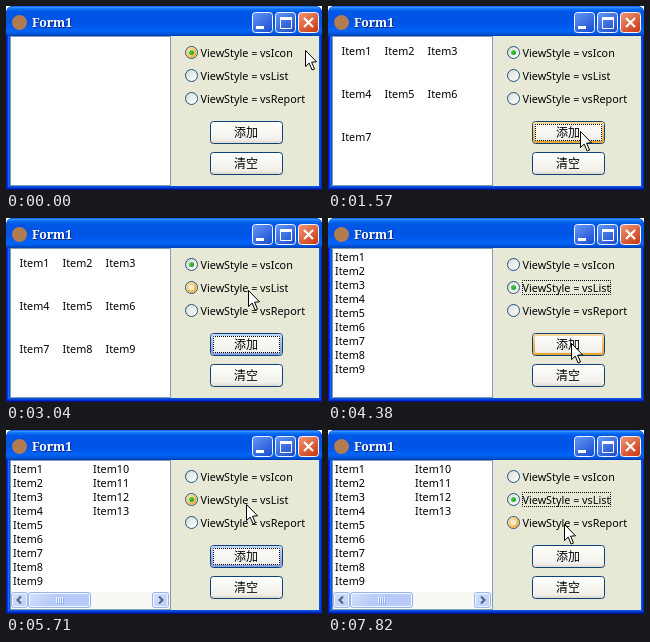
Animation, 316 px wide and 184 px high, one loop 8000 ms. Source, as an HTML page with a canvas:

```html
<!DOCTYPE html>
<html lang="zh">
<head>
<meta charset="utf-8">
<title>Form1</title>
<style>
html, body { margin: 0; width: 100%; height: 100%; overflow: hidden; background: #fff; }
canvas { display: block; }
</style>
</head>
<body>
<canvas id="stage" width="316" height="184"></canvas>
<script>
const c = document.getElementById('stage').getContext('2d');
const LOOP = 8000;
const UI = '10.8px "Noto Sans", "Open Sans", sans-serif';
const CJK = '12px "Noto Sans CJK SC", "Noto Sans CJK", sans-serif';
const TITLE = 'bold 12.3px "Noto Serif", "Liberation Serif", serif';
const FACE = '#e8e8d7';

// Cursor travel: start, end, steps, target x, target y
const START = [299, 44];
const MOVES = [
  [60, 420, 7, 252, 125],
  [2680, 3040, 7, 242, 72],
  [4020, 4380, 7, 243, 125],
  [5530, 5710, 4, 240, 74],
  [5770, 5770, 1, 239, 47],
  [6620, 6930, 6, 238, 69],
  [7580, 7820, 5, 236, 94]
];
const ADDED = [680, 810, 1010, 1130, 1260, 1380, 1570, 1760, 1950, 4570, 4760, 4950, 5070];
const PRESS = 60;
const CHECKED = [[0, 0], [3360, 1], [6030, 0], [7180, 1]];
const FOCUS = [[0, ''], [620, 'add'], [3300, 1], [4510, 'add'], [5970, 0], [7120, 1]];
const RADIOS = [['vsIcon', 46.5, 288], ['vsList', 69.5, 283], ['vsReport', 92.5, 300]];

const at = (steps, t) => steps.filter(s => s[0] <= t).pop()[1];

function cursorAt(t) {
  let [x, y] = START;
  for (const [a, b, n, tx, ty] of MOVES) {
    if (t < a) break;
    const k = t >= b ? n : Math.floor((t - a) / (b - a) * (n - 1) + 1e-6) + 1;
    const u = k / n, e = u * u * (3 - 2 * u);
    x += Math.round((tx - x) * e);
    y += Math.round((ty - y) * e);
  }
  return [x, y];
}

function rect(x, y, w, h, fill) {
  c.fillStyle = fill;
  c.fillRect(x, y, w, h);
}

function grad(x0, y0, x1, y1, ...stops) {
  const g = c.createLinearGradient(x0, y0, x1, y1);
  stops.forEach((s, i) => Array.isArray(s)
    ? g.addColorStop(s[0], s[1])
    : g.addColorStop(i / (stops.length - 1), s));
  return g;
}

function box(x, y, w, h, r, fill, line) {
  c.beginPath();
  c.roundRect(x + .5, y + .5, w - 1, h - 1, r);
  if (fill) { c.fillStyle = fill; c.fill(); }
  if (line) { c.strokeStyle = line; c.lineWidth = 1; c.stroke(); }
}

function disc(x, y, r, fill, line, width = 1) {
  c.beginPath();
  c.arc(x, y, r, 0, 7);
  if (fill) { c.fillStyle = fill; c.fill(); }
  if (line) { c.strokeStyle = line; c.lineWidth = width; c.stroke(); }
}

function lines(color, width, ...pts) {
  c.beginPath();
  pts.forEach(([x, y], i) => i ? c.lineTo(x, y) : c.moveTo(x, y));
  c.strokeStyle = color;
  c.lineWidth = width;
  c.stroke();
}

function text(s, x, y, font = UI, color = '#000', align = 'left') {
  c.font = font;
  c.fillStyle = color;
  c.textAlign = align;
  c.fillText(s, x, y);
}

// Alternate whole pixels; the offset keeps the dashes on the pixel grid
function dotted(x, y, w, h) {
  c.setLineDash([1, 1]);
  c.lineDashOffset = .5;
  box(x, y, w, h, 0, null, '#000');
  c.setLineDash([]);
}

function caption(x, top, bottom, edge) {
  box(x, 6, 21, 21, 3, grad(x, 6, x + 16, 27, top, bottom), edge);
}

function frame() {
  rect(0, 0, 316, 184, '#fff');
  c.save();
  c.beginPath();
  c.roundRect(0, 0, 316, 184, [7, 7, 0, 0]);
  c.clip();
  ['#0019cf', '#0831d9', '#166aee', '#0855dd'].forEach((s, i) => rect(i, 0, 316 - i, 184, s));
  ['#0855dd', '#0441d8', '#0029c2'].forEach((s, i) => rect(313 + i, 0, 1, 184, s));
  ['#0855dd', '#0441d8', '#0029c2', '#00138c'].forEach((s, i) => rect(3 - i, 180 + i, 310 + 2 * i, 1, s));
  rect(0, 0, 316, 30, grad(0, 0, 0, 30, [0, '#0058ee'], [.05, '#3590fc'], [.1, '#0a6ff6'],
    [.2, '#0057e5'], [.5, '#0054e4'], [.66, '#0058ee'], [.8, '#0263f6'], [.88, '#005eea'],
    [.94, '#0050d4'], [1, '#003cae']));
  c.restore();

  disc(13.5, 16.5, 7.5, '#b07c50');
  text('Form1', 27, 22, TITLE, '#0a2a86');
  text('Form1', 26, 21, TITLE, '#fff');

  caption(246, '#6a9bf8', '#1c4fd2', '#f4f7ff');
  caption(269, '#6a9bf8', '#1c4fd2', '#f4f7ff');
  caption(292, '#f09a7c', '#cc3c14', '#f8f4f4');
  rect(250, 20, 8, 3, '#fff');
  box(274, 11, 12, 12, 0, null, '#fff');
  rect(274, 11, 12, 3, '#fff');
  lines('#fff', 2.2, [298, 12], [307, 21]);
  lines('#fff', 2.2, [307, 12], [298, 21]);
  rect(4, 30, 309, 150, FACE);
  rect(4, 30, 161, 150, '#7f9db9');
  rect(5, 31, 159, 148, '#fff');
}

function radio(i, y, right, on, hot, down, focus) {
  const x = 185.5;
  disc(x, y, 6, down ? grad(x - 5, y - 5, x + 5, y + 5, '#a6acac', '#e0e1dc')
    : grad(x - 5, y - 5, x + 5, y + 5, '#dcdcd6', '#fff'), '#1d5281');
  if (hot && !down) disc(x, y, 4.2, '#f2ead2', grad(x - 4, y - 4, x + 4, y + 4, '#fddc94', '#f0a828'), 2.4);
  if (on) disc(x, y, 2.5, grad(x - 2, y - 2, x + 2, y + 2, '#55d551', '#159a16'));
  text('ViewStyle = ' + RADIOS[i][0], 194.5, y + 4.5);
  if (focus) dotted(194, y - 7.5, right - 194, 15);
}

function button(label, y, hot, down, focus) {
  const x = 204, w = 73, h = 23;
  box(x, y, w, h, 3, down ? grad(0, y, 0, y + h, '#d8d7cd', '#e6e5df')
    : grad(0, y, 0, y + h, [0, '#fff'], [.8, '#f1f0ea'], [1, '#d8d2c6']), '#0c4276');
  const glow = hot ? ['#fddc9c', '#e8a028'] : focus ? ['#c4dcfc', '#7c98e4'] : null;
  if (glow && !down) {
    c.beginPath();
    c.roundRect(x + 2, y + 2, w - 4, h - 4, 2);
    c.strokeStyle = grad(0, y, 0, y + h, ...glow);
    c.lineWidth = 2;
    c.stroke();
  }
  if (focus) dotted(x + 3, y + 3, w - 6, h - 6);
  const d = down ? 1 : 0;
  text(label, x + 36 + d, y + 16 + d, CJK, '#000', 'center');
}

function scrollBox(x, y, w, h) {
  box(x, y, w, h, 2, grad(x, y, x + Math.min(w, 17), y + Math.min(h, 17), '#d6e3fe', '#b7cbf8'), '#9cb4ec');
  box(x + 1, y + 1, w - 2, h - 2, 1, null, '#f0f5ff');
}

function arrow(x, y, angle) {
  c.save();
  c.translate(x, y);
  c.rotate(angle);
  lines('#4d6185', 2, [-3.5, 2], [0, -1.5], [3.5, 2]);
  c.restore();
}

function hScroll() {
  rect(5, 162, 159, 17, '#f8f8f4');
  scrollBox(5, 162, 17, 16);
  scrollBox(146, 162, 17, 16);
  scrollBox(22, 162, 63, 16);
  arrow(13, 170, -Math.PI / 2);
  arrow(155, 170, Math.PI / 2);
  for (let x = 50; x < 58; x += 2) {
    rect(x, 167, 1, 6, '#eef4fe');
    rect(x + 1, 168, 1, 6, '#8cb0f8');
  }
}

function vScroll() {
  rect(147, 31, 17, 148, '#f8f8f4');
  scrollBox(147, 31, 16, 17);
  scrollBox(147, 161, 16, 17);
  scrollBox(147, 48, 16, 83);
  arrow(155, 39.5, 0);
  arrow(155, 169.5, Math.PI);
  for (let y = 85; y < 93; y += 2) {
    rect(152, y, 6, 1, '#eef4fe');
    rect(153, y + 1, 6, 1, '#8cb0f8');
  }
}

function items(count, asList) {
  c.save();
  c.beginPath();
  c.rect(5, 31, 159, 148);
  c.clip();
  const rows = count > 10 ? 9 : 10;
  const mid = count > 9 ? 26.5 : 28.5;
  for (let i = 0; i < count; i++) {
    const name = 'Item' + (i + 1);
    if (asList) text(name, 7 + 80 * Math.floor(i / rows), 43 + 14 * (i % rows));
    else text(name, mid + 43 * (i % 3), 49 + 43 * Math.floor(i / 3), UI, '#000', 'center');
  }
  if (asList && count > 10) hScroll();
  if (!asList && count > 9) vScroll();
  c.restore();
}

function pointer(x, y) {
  const pts = [[0, 0], [0, 16], [3.7, 12.6], [6.6, 19.5], [9, 18.5], [6.1, 11.7], [11, 11.3]];
  c.beginPath();
  pts.forEach(([px, py]) => c.lineTo(x + px + .5, y + py + .5));
  c.closePath();
  c.fillStyle = '#fff';
  c.fill();
  c.strokeStyle = '#000';
  c.lineWidth = 1;
  c.stroke();
}

function draw(t) {
  const [x, y] = cursorAt(t);
  const checked = at(CHECKED, t), focus = at(FOCUS, t);
  const nextCheck = CHECKED.find(s => s[0] > t && s[0] - PRESS <= t);
  const adding = ADDED.some(a => t >= a - PRESS && t < a);
  const over = (top, bottom, left, right) => y >= top && y < bottom && x >= left && x < right;

  frame();
  items(ADDED.filter(a => a <= t).length, checked === 1);
  RADIOS.forEach(([, ry, right], i) => radio(i, ry, right, checked === i,
    over(ry - 8, ry + 9, 179, 312), !!nextCheck && nextCheck[1] === i, focus === i));
  button('添加', 115, over(115, 138, 204, 277), adding, focus === 'add');
  button('清空', 146, over(146, 169, 204, 277), false, false);
  pointer(x, y);
}

const begin = performance.now();
function tick() {
  draw((performance.now() - begin) % LOOP);
  requestAnimationFrame(tick);
}
tick();
</script>
</body>
</html>
```
